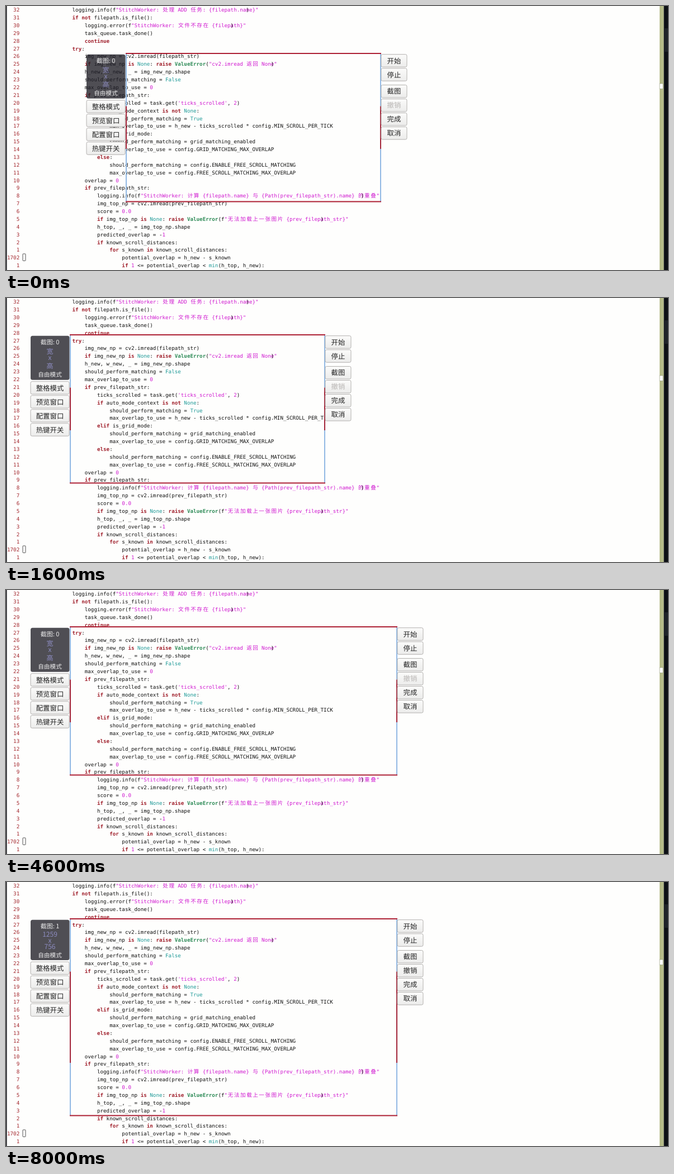
These frames come from a looping animation (1184 px wide and 473 px high, 8.2 s). An HTML page:

```html
<!DOCTYPE html>
<html lang="zh-CN">
<head>
<meta charset="utf-8">
<title>Scroll capture</title>
<style>
html, body { margin: 0; width: 100%; height: 100%; overflow: hidden; background: #fefefd; }
svg { display: block; width: 100%; height: 100%; }
text { white-space: pre; text-rendering: geometricPrecision; }
.code text { font: 9.22px "DejaVu Sans Mono", monospace; fill: #111; }
.code .cjk { font: 9.6px "Noto Sans CJK SC", "Noto Sans CJK", sans-serif; }
.code .num { fill: #a3262c; }
.code .key { fill: #a0202c; font-weight: bold; }
.code .str { fill: #d01ad0; }
.code .fn { fill: #1f9a98; }
.code .type { fill: #2e8b57; font-weight: bold; }
.ui text { font-family: "Noto Sans CJK SC", "Noto Sans CJK", "Noto Sans", sans-serif; text-anchor: middle; }
.btn { fill: url(#face); stroke: #b3b1af; }
</style>
</head>
<body>
<svg id="stage" viewBox="0 0 1184 473" preserveAspectRatio="none">
  <defs>
    <linearGradient id="face" x2="0" y2="1">
      <stop stop-color="#fbfbfa"/><stop offset="1" stop-color="#ececeb"/>
    </linearGradient>
  </defs>
</svg>
<script>
const stage = document.getElementById('stage');

function add(parent, tag, attrs = {}, text = '') {
  const el = document.createElementNS('http://www.w3.org/2000/svg', tag);
  set(el, attrs);
  el.textContent = text;
  parent.appendChild(el);
  return el;
}
function set(el, attrs) {
  for (const k in attrs) el.setAttribute(k, attrs[k]);
}
const rect = (parent, x, y, width, height, fill, more) =>
  add(parent, 'rect', { x, y, width, height, fill, ...more });

// Editor
const CELL = 5.55, LINE = 13.88, LEFT = 2, BASE = 10.2;
const source = `
                logging.info(f"StitchWorker: 处理 ADD 任务: {filepath.name}")
                if not filepath.is_file():
                    logging.error(f"StitchWorker: 文件不存在 {filepath}")
                    task_queue.task_done()
                    continue
                try:
                    img_new_np = cv2.imread(filepath_str)
                    if img_new_np is None: raise ValueError("cv2.imread 返回 None")
                    h_new, w_new, _ = img_new_np.shape
                    should_perform_matching = False
                    max_overlap_to_use = 0
                    if prev_filepath_str:
                        ticks_scrolled = task.get('ticks_scrolled', 2)
                        if auto_mode_context is not None:
                            should_perform_matching = True
                            max_overlap_to_use = h_new - ticks_scrolled * config.MIN_SCROLL_PER_TICK
                        elif is_grid_mode:
                            should_perform_matching = grid_matching_enabled
                            max_overlap_to_use = config.GRID_MATCHING_MAX_OVERLAP
                        else:
                            should_perform_matching = config.ENABLE_FREE_SCROLL_MATCHING
                            max_overlap_to_use = config.FREE_SCROLL_MATCHING_MAX_OVERLAP
                    overlap = 0
                    if prev_filepath_str:
                        logging.info(f"StitchWorker: 计算 {filepath.name} 与 {Path(prev_filepath_str).name} 的重叠")
                        img_top_np = cv2.imread(prev_filepath_str)
                        score = 0.0
                        if img_top_np is None: raise ValueError(f"无法加载上一张图片 {prev_filepath_str}")
                        h_top, _, _ = img_top_np.shape
                        predicted_overlap = -1
                        if known_scroll_distances:
                            for s_known in known_scroll_distances:
                                potential_overlap = h_new - s_known
                                if 1 <= potential_overlap < min(h_top, h_new):`.slice(1).split('\n');

const rules = [
  ['str', /^("[^"]*"|'[^']*'|\d[\d.]*)$/],
  ['key', /^(if|elif|else|not|is|in|for|try|raise|continue)$/],
  ['fn', /^(None|True|False|min)$/],
  ['type', /^ValueError$/]
];
const tokens = /"[^"]*"|'[^']*'|\w+(?:\.\d+)?|[^\w\s"']+/g;
const isWide = s => /[\u4e00-\u9fff]/.test(s);

const editor = add(stage, 'g', { class: 'code' });

function put(str, col, y, cls) {
  for (const run of str.match(/[\u4e00-\u9fff]+|[^\u4e00-\u9fff]+/g)) {
    const wide = isWide(run), x = LEFT + col * CELL;
    add(editor, 'text', wide
      ? { class: cls + ' cjk', y, x: [...run].map((_, i) => (x + 0.8 + i * 2 * CELL).toFixed(2)).join(' ') }
      : { class: cls, y, x: x.toFixed(2) }, run);
    col += run.length * (wide ? 2 : 1);
  }
}

const CURRENT = 32;
source.forEach((line, i) => {
  const y = (BASE + i * LINE).toFixed(2);
  const label = i === CURRENT ? '1702' : String(Math.abs(CURRENT - i));
  put(label, 4 - label.length, y, 'num');
  for (const m of line.matchAll(tokens)) {
    const rule = rules.find(r => r[1].test(m[0]));
    put(m[0], 5 + m.index, y, rule ? rule[0] : '');
  }
});
rect(editor, 30, 444, 5, 12.5, 'none', { stroke: '#555', rx: 0.8 });

// Screen edges
rect(stage, 0, 0, 1.5, 473, '#15151a');
rect(stage, 1169, 0, 7.5, 473, '#b4ba88');
rect(stage, 1176.5, 0, 7.5, 473, '#0d1015');
rect(stage, 1178, 40, 6, 42, '#1f2329');
rect(stage, 1169, 139, 6, 9.5, '#fff', { stroke: '#8b8f70', 'stroke-width': 0.6 });

// Capture overlay
const ui = add(stage, 'g', { class: 'ui' });
const BLUE = '#92b9e4', RED = '#a3263a', CORNER = 94.5;
const sides = [0, 1].map(() => [BLUE, RED, BLUE].map(c => rect(ui, 0, 0, 2, 0, c)));
const bars = [0, 1].map(() => rect(ui, 0, 0, 0, 2, '#ad2034'));
const leftUI = add(ui, 'g'), rightUI = add(ui, 'g');

function label(parent, str, x, y, size, fill, more) {
  return add(parent, 'text', { x, y: y + size * 0.37, 'font-size': size, fill, ...more }, str);
}
function button(parent, str, cx, cy, w) {
  rect(parent, cx - w / 2, cy - 11.3, w, 22.6, '', { class: 'btn', rx: 2.5 });
  return label(parent, str, cx, cy, 12.4, '#222');
}

const MID = -36.5;
const panel = rect(leftUI, -71, 1.8, 69.5, 79, '#1e1d26', { rx: 3.5, 'fill-opacity': 0.78 });
const bold = { 'font-weight': 500 };
const count = label(leftUI, '', MID, 13, 11, '#ececec', bold);
const dims = [0, 1, 2].map(() => label(leftUI, '', MID, 0, 12, '#8d8cc0'));
const mode = label(leftUI, '自由模式', MID, 0, 10.7, '#ececec', bold);
const tools = add(leftUI, 'g');
['整格模式', '预览窗口', '配置窗口', '热键开关'].forEach((s, i) => button(tools, s, MID, 95 + i * 25, 69));
const actions = ['开始', '停止', '截图', '撤销', '完成', '取消'].map((s, i) =>
  button(rightUI, s, 24, 13 + i * 25 + (i > 1 ? 4.8 : 0), 46));

// Keys hold until the next one: time, left, top, right, bottom
const LOOP = 8200, CAPTURED = 7200;
const W = 455, H = 265.5;
const at = (t, x, y) => [t, x, y, x + W, y + H];
const stretch = (t, p, q) => [t, 115, 66, 570 + 129 * p, 331.5 + 87 * q];
const keys = [
  at(0, 215, 85), at(600, 184, 83), at(800, 137, 79), at(1000, 118, 75),
  at(1200, 113, 72), at(1400, 114, 68), at(1600, 115, 66),
  stretch(3000, 0.2, 0), stretch(3200, 0.62, 0), stretch(3400, 0.92, 0), stretch(3600, 1, 0),
  stretch(5000, 1, 0.12), stretch(5200, 1, 0.4), stretch(5400, 1, 0.7),
  stretch(5600, 1, 0.9), stretch(5800, 1, 0.98), stretch(6000, 1, 1)
];

function draw(t) {
  const [, l, top, r, b] = keys.filter(k => k[0] <= t).pop();
  bars.forEach((bar, i) => set(bar, { x: l - 1, width: r - l + 2, y: (i ? b : top) - 1 }));
  const cuts = [top, top + CORNER, b - CORNER, b];
  sides.forEach((parts, s) => parts.forEach((part, i) =>
    set(part, { x: (s ? r : l) - 1, y: cuts[i], height: cuts[i + 1] - cuts[i] })));
  set(leftUI, { transform: `translate(${l} ${top})` });
  set(rightUI, { transform: `translate(${r} ${top})` });

  const done = t >= CAPTURED;
  count.textContent = done ? '截图: 1' : '截图: 0';
  (done ? ['1259', 'x', '756'] : ['宽', 'x', '高']).forEach((s, i) => {
    dims[i].textContent = s;
    set(dims[i], { y: done ? 31.5 + i * 11.4 : 33.6 + i * 13 - (i === 1 ? 1.2 : 0) });
  });
  set(mode, { y: done ? 68.8 : 75.2 });
  set(panel, { height: done ? 72.3 : 79 });
  set(tools, { transform: `translate(0 ${done ? -6.7 : 0})` });
  set(actions[3], { fill: done ? '#222' : '#b8b5b3' });
}

function tick() {
  draw(performance.now() % LOOP);
  requestAnimationFrame(tick);
}
tick();
</script>
</body>
</html>
```
